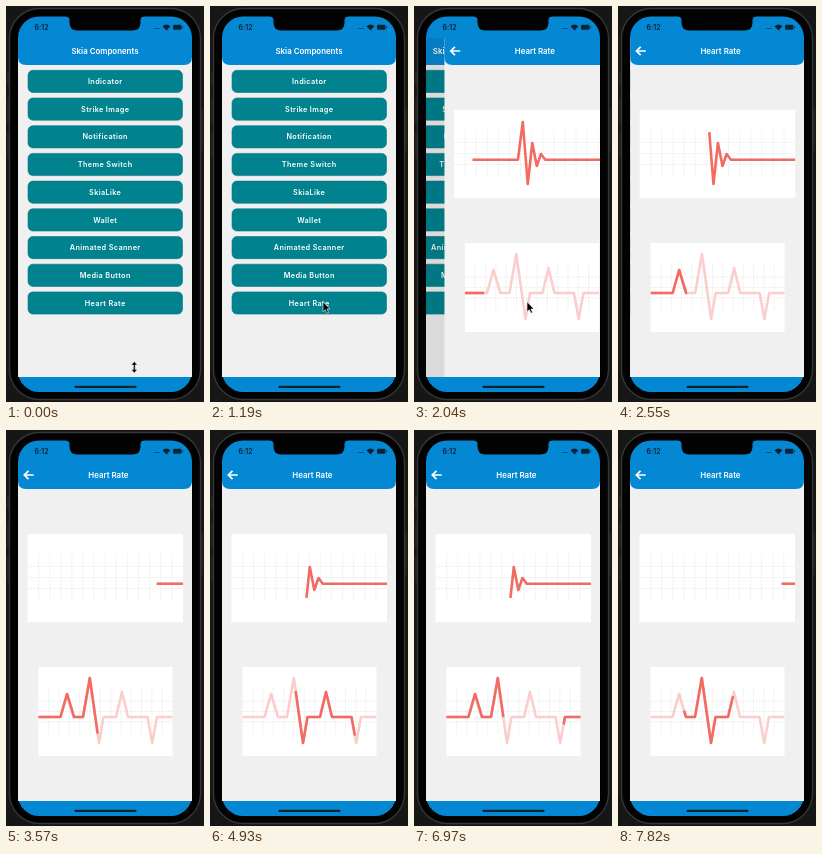
Animation, 198 px wide and 396 px high, one loop 7.99 s. Source, as an HTML page:

```html
<!DOCTYPE html>
<html lang="en">
<head>
<meta charset="utf-8">
<title>Heart rate component demo</title>
<style>
  html, body { margin: 0; width: 100%; height: 100%; overflow: hidden; background: #161616; }
  svg { display: block; width: 198px; height: 396px; }
  text { font: 600 7.9px Inter, sans-serif; fill: #fff; text-anchor: middle; }
  .item text { font-size: 7.3px; letter-spacing: .36px; }
  .item rect { fill: #00838f; stroke: #0a7680; stroke-width: .6; }
  .grid { fill: none; stroke: #e7e7ea; stroke-width: .7; stroke-dasharray: 2 1; }
  .wave { fill: none; stroke: #f26a62; stroke-width: 2.6; stroke-linejoin: round; }
  .pale { stroke: #fbcecb; }
</style>
</head>
<body>
<svg viewBox="0 0 198 396">
  <defs>
    <clipPath id="stack"><rect x="12" y="32" width="174" height="339"/></clipPath>
    <path id="header" d="M12 32H186V51q0 8-8 8H20q-8 0-8-8Z" fill="#0588d4"/>
    <rect id="page" x="12" y="32" width="174" height="339" fill="#f0f0f1"/>
  </defs>

  <path d="M2 66v13M2 92v26M2 126v26M196 103v42" stroke="#262626" stroke-width="1.6"/>
  <rect x="3.5" y="2.5" width="191" height="391" rx="30" fill="#020202" stroke="#363636" stroke-width="1.4"/>
  <rect x="12" y="10.5" width="174" height="375.5" rx="21" fill="#0588d4"/>

  <g clip-path="url(#stack)">
    <g id="menu">
      <use href="#page"/><use href="#header"/>
      <text x="99" y="48">Skia Components</text>
      <g id="items"></g>
      <rect id="dim" x="12" y="32" width="174" height="339" opacity="0"/>
    </g>
    <g id="detail">
      <use href="#page"/><use href="#header"/>
      <text x="102.4" y="48">Heart Rate</text>
      <path d="M27.7 45H18.5M22.5 40.8L18.3 45L22.5 49.2" fill="none" stroke="#fff" stroke-width="1.7"/>
      <rect x="21.5" y="104" width="155.5" height="88" fill="#fff"/>
      <path class="grid" id="gridA"/>
      <path class="wave" id="pulse" d="M22 153.7H85.5L90.3 116L95.3 178L99.8 137L104.3 160L108.5 148L112.8 153.7H177"/>
      <rect x="32.5" y="237" width="134" height="89" fill="#fff"/>
      <path class="grid" id="gridB"/>
      <path class="wave pale" id="track" d="M32.5 287H54.5L61 264L68 287H77L83.8 248L93 313L97.5 287H110L116 262L122 287H141.5L146.2 313L151 287H166.5"/>
      <path class="wave" id="runner" pathLength="360"/>
    </g>
  </g>

  <path d="M60 9H138V10.5Q134.5 10.5 134.5 14V16.5Q134.5 24.5 126.5 24.5H71.5Q63.5 24.5 63.5 16.5V14Q63.5 10.5 60 10.5Z" fill="#020202"/>
  <g fill="#0b2435">
    <text x="35.5" y="24" style="font-size:7px;fill:#0b2435">6:12</text>
    <path d="M148.5 22h1v1h-1zm2 0h1v1h-1zm2 0h1v1h-1z"/>
    <path d="M156.5 20.3Q160.5 16.5 164.5 20.3L160.5 24.5Z"/>
    <rect x="167" y="18.8" width="8.5" height="5" rx="1.3"/>
    <rect x="176" y="20.4" width=".8" height="1.8"/>
  </g>
  <rect x="68.5" y="379.7" width="62" height="2.3" rx="1.1" fill="#0b2230"/>

  <path id="resize" d="M128.3 355.5L131.3 359H129.2V363.5H131.3L128.3 367L125.3 363.5H127.4V359H125.3Z" stroke="#fff" stroke-width=".5"/>
  <path id="arrow" d="M0 0V10L2.3 8L4 11.5L5.6 10.8L4 7.3H7Z" stroke="#fff" stroke-width=".6"/>
</svg>

<script>
const LOOP = 7990, STEP = 170, OPEN = 1870, PULSE = 2040, WIDTH = 174;
const el = id => document.getElementById(id);
const show = (id, on) => el(id).style.display = on ? '' : 'none';
const shift = (id, x, y = 0) => el(id).setAttribute('transform', `translate(${x} ${y})`);
const dash = (id, value) => el(id).setAttribute('stroke-dasharray', value);

el('items').innerHTML = ['Indicator', 'Strike Image', 'Notification', 'Theme Switch', 'SkiaLike',
  'Wallet', 'Animated Scanner', 'Media Button', 'Heart Rate'].map((name, i) =>
  `<g class="item" transform="translate(0 ${i * 27.7})">
    <rect x="22" y="64.3" width="154.5" height="22.2" rx="5"/><text x="99.2" y="78">${name}</text></g>`).join('');

function grid(id, left, right, mid, gap) {
  let d = '';
  for (const row of [-1, 0, 1]) d += `M${left} ${mid + row * gap}H${right}`;
  for (let x = left + gap; x < right - 2; x += gap) d += `M${x} ${mid - 24}V${mid + 24}`;
  el(id).setAttribute('d', d);
}
grid('gridA', 21.5, 177, 147.5, 11.1);
grid('gridB', 32.5, 166.5, 281.5, 10.3);
el('runner').setAttribute('d', el('track').getAttribute('d'));

// Length erased from the pulse over one cycle, as [ms, px]
const erase = [[0, 0], [170, 18], [1020, 174], [1700, 286], [1870, 299], [PULSE, 312]];
function erased(time) {
  const i = erase.findIndex(([ms]) => ms > time);
  const [t0, a] = erase[i - 1], [t1, b] = erase[i];
  return a + (b - a) * (time - t0) / (t1 - t0);
}

function draw(now) {
  const t = Math.floor(now % LOOP / STEP) * STEP;
  const opened = t >= OPEN;

  show('resize', t < 340);
  show('arrow', t >= 340 && t < 2550);
  const k = Math.min(1, Math.max(0, (t - 170) / 1020));
  const move = k * k * (3 - 2 * k);
  shift('arrow', 128 - 15 * move, 358 - 62.3 * move);

  const rest = opened ? Math.exp((1800 - t) / 107) : 1;
  shift('detail', WIDTH * rest);
  shift('menu', -0.3 * WIDTH * (1 - rest));
  el('dim').setAttribute('opacity', 0.1 * (1 - rest));
  show('detail', opened);

  if (opened) {
    dash('pulse', `0 ${erased((t - OPEN) % PULSE)} 999`);
    const head = (t - 1852) * 0.101;
    dash('runner', head < 180 ? `${head} 999` : '180 180');
    el('runner').setAttribute('stroke-dashoffset', head < 180 ? 0 : 180 - head);
  }
  requestAnimationFrame(() => draw(performance.now()));
}
draw(0);
</script>
</body>
</html>
```
